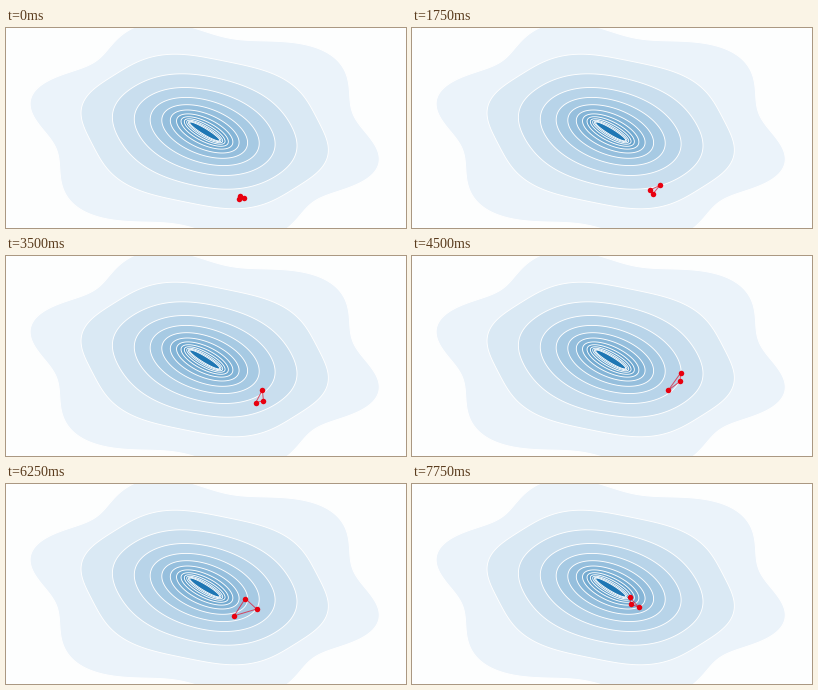
These frames come from a looping animation (400 px wide and 200 px high, 8 s). A matplotlib script:

```python
import numpy as np
import matplotlib.pyplot as plt
from matplotlib.animation import FuncAnimation
from matplotlib.colors import to_rgb

W, H, DPI = 400, 200, 100
STEP_MS = 250
PX = 72 / DPI  # one pixel in points

CENTER = np.array([198.7, 103.5])
STRETCH = 1.6  # horizontal scale of the landscape
LEVELS = 13
PALE, DEEP = np.array(to_rgb("#ebf3fa")), np.array(to_rgb("#1f77b4"))

START = np.array([(232.5, 171), (234.2, 168.4), (237.5, 170)])

# Each move sends one vertex through the midpoint of the other two;
# the gain tells reflection (1), expansion (> 1) or contraction (< 0).
ORDER = [1, 0, 2] * 3 + [0, 2, 1] + [2, 0, 2, 1]
GAINS = [-1.2, 1.6, 1.5, 1.8, 1.5, 1, 1.4, 1.3,
         0.9, 1.5, 0.9, 1.5, 1.2, 0.9, -0.2, 0.9]
FRAMES = 2 * len(ORDER)


def contour(level):
    """Diagonal ellipse around a short ridge, wavier towards the outside."""
    b = 92 * 0.74**level
    a = 10.5 + 1.05 * b
    t = np.linspace(0, 2 * np.pi, 360, endpoint=False)
    wave = 8.5 * (b / 92)**5 * (0.5 - np.cos(6 * t) - 0.6 * np.cos(2 * t))
    u, v = (a + wave) * np.cos(t), (b + wave) * np.sin(t)
    x, y = (u - v) / np.sqrt(2), (u + v) / np.sqrt(2)
    return CENTER[0] + STRETCH * x, CENTER[1] + y


def ease(t):
    return t**3 * (6 * t**2 - 15 * t + 10)


def moved(pts, vertex, gain):
    mid = (pts.sum(axis=0) - pts[vertex]) / 2
    out = pts.copy()
    out[vertex] = mid + gain * (mid - pts[vertex])
    return out


def simplex(frame):
    step, half = divmod(frame, 2)
    pts = START
    for vertex, gain in zip(ORDER[:step], GAINS):
        pts = moved(pts, vertex, gain)
    goal = moved(pts, ORDER[step], GAINS[step])
    return pts + ease(0.28 + 0.52 * half) * (goal - pts)


fig = plt.figure(figsize=(W / DPI, H / DPI), dpi=DPI, facecolor="#fdfefe")
ax = fig.add_axes([0, 0, 1, 1])
ax.set_xlim(0, W)
ax.set_ylim(H, 0)
ax.axis("off")

for level in range(LEVELS):
    color = PALE + (DEEP - PALE) * level / (LEVELS - 1)
    ax.fill(*contour(level), facecolor=color, edgecolor="white",
            linewidth=0.9 * PX)

edges, = ax.plot([], [], color="#e0102c", alpha=0.7, lw=1.0 * PX, zorder=5)
dots, = ax.plot([], [], "o", color="#e8000f", ms=5.5 * PX, mew=0, zorder=6)


def draw(frame):
    pts = simplex(frame)
    edges.set_data(*np.vstack([pts, pts[:1]]).T)
    dots.set_data(*pts.T)
    return edges, dots


anim = FuncAnimation(fig, draw, frames=FRAMES, interval=STEP_MS,
                     repeat=True, repeat_delay=0, blit=False)
plt.show()
```
